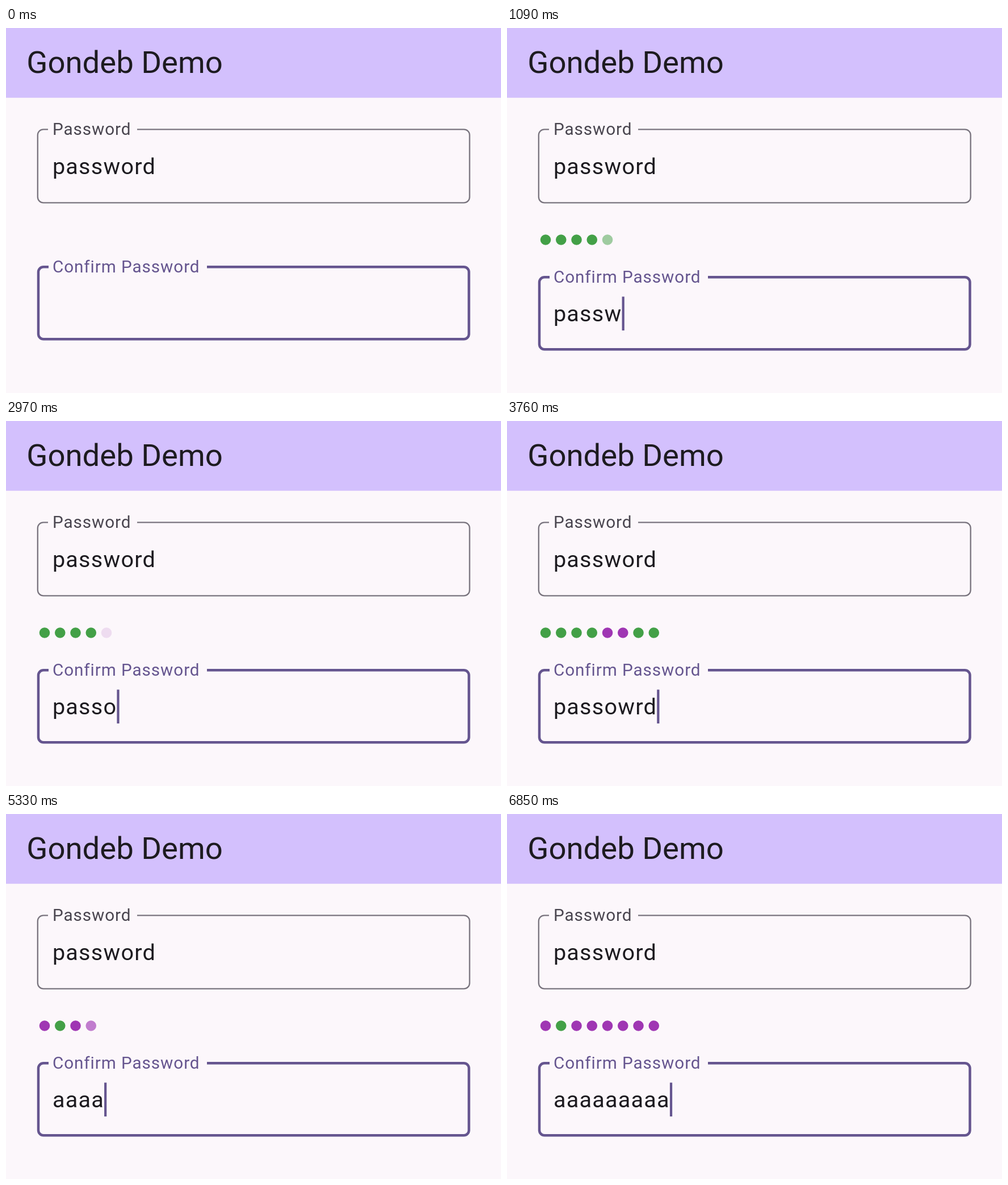
An HTML page that plays this animation: 872x642 px, repeating every 6.88 s.

```html
<!DOCTYPE html>
<html lang="en">
<head>
<meta charset="utf-8">
<title>Password confirmation</title>
<style>
  html, body { margin: 0; width: 100%; height: 100%; overflow: hidden; background: #fcf7fb; }
  svg { display: block; width: 872px; height: 642px; }
  text { font-family: Roboto, Arial, sans-serif; fill: #1d1b20; white-space: pre; }
  .title { font-size: 54.5px; }
  .value { font-size: 39.6px; letter-spacing: 1.24px; }
  .label { font-size: 29.7px; letter-spacing: .93px; fill: #49454f; }
  .outline { fill: none; stroke: #79747e; stroke-width: 2.3; }
  .focus .outline { stroke: #65558f; stroke-width: 4.5; }
  .focus .label { fill: #65558f; }
  #caret { fill: #65558f; }
</style>
</head>
<body>
<svg viewBox="0 0 872 642">
  <rect width="872" height="642" fill="#fcf7fb"/>
  <rect width="872" height="122.7" fill="#d3c0fd"/>
  <text class="title" x="36.3" y="78.7">Gondeb Demo</text>

  <path class="outline" d="M231 178.3H806.7a10 10 0 0 1 10 10V297.3a10 10 0 0 1 -10 10H65.8a10 10 0 0 1 -10 -10V188.3a10 10 0 0 1 10 -10H74"/>
  <text class="label" x="81.9" y="188">Password</text>
  <text class="value" x="81.9" y="256.5">password</text>

  <g id="dots"></g>

  <g id="confirm" class="focus">
    <path class="outline" d="M354 420.2H806.5a9 9 0 0 1 9 9V538.2a9 9 0 0 1 -9 9H66a9 9 0 0 1 -9 -9V429.2a9 9 0 0 1 9 -9H75"/>
    <text class="label" x="81.9" y="430.3">Confirm Password</text>
    <text class="value" id="entry" x="81.9" y="497.7"></text>
    <rect id="caret" y="454.5" width="4.2" height="59.5"/>
  </g>
</svg>
<script>
const LOOP = 6880, BLINK = 500, FADE = 150, SLIDE = 200;
const SECRET = 'password', GREEN = '#43a047', PURPLE = '#9f36b3';
const $ = id => document.getElementById(id);
const clamp = v => Math.max(0, Math.min(1, v));
const ease = v => v * v * (3 - 2 * v);

// Timeline of edits: each entry holds the full text after that keystroke.
const edits = [{ at: -750, text: '' }];
const lastText = () => edits[edits.length - 1].text;
function type(chars, start, step) {
  [...chars].forEach((c, i) => edits.push({ at: start + i * step, text: lastText() + c }));
}
function erase(count, start, step) {
  for (let i = 0; i < count; i++) edits.push({ at: start + i * step, text: lastText().slice(0, -1) });
}
type('password', 455, 140);
erase(4, 2480, 80);
type('owrd', 2950, 150);
erase(8, 3950, 60);
type('aaaaaaaaa', 4900, 112);

const dots = [...SECRET].map((_, i) => {
  const dot = document.createElementNS('http://www.w3.org/2000/svg', 'circle');
  dot.setAttribute('cx', 68 + i * 27.25);
  dot.setAttribute('cy', 372.5);
  dot.setAttribute('r', 9.3);
  return $('dots').appendChild(dot);
});

// Presence of the character at index i, ramped over the given duration.
function presence(past, i, t, duration) {
  let shown = false, since = -1e4, char = '';
  for (const { at, text } of past) {
    const has = text.length > i;
    if (has) char = text[i];
    if (has !== shown) { shown = has; since = at; }
  }
  const ramp = clamp((t - since) / duration);
  return { level: shown ? ramp : 1 - ramp, char };
}

function draw() {
  const t = performance.now() % LOOP;
  const past = edits.filter(e => e.at <= t);
  const { at, text } = past[past.length - 1];

  dots.forEach((dot, i) => {
    const { level, char } = presence(past, i, t, FADE);
    dot.setAttribute('opacity', level);
    dot.setAttribute('fill', char === SECRET[i] ? GREEN : PURPLE);
  });

  const shift = 18 * ease(presence(past, 0, t, SLIDE).level);
  $('confirm').setAttribute('transform', `translate(0 ${shift})`);

  const entry = $('entry');
  if (entry.textContent !== text) entry.textContent = text;
  const width = text ? entry.getComputedTextLength() : 0;
  $('caret').setAttribute('x', 82 + width);
  $('caret').setAttribute('opacity', Math.floor((t - at) / BLINK) % 2 ? 0 : 1);
  requestAnimationFrame(draw);
}
draw();
</script>
</body>
</html>
```
